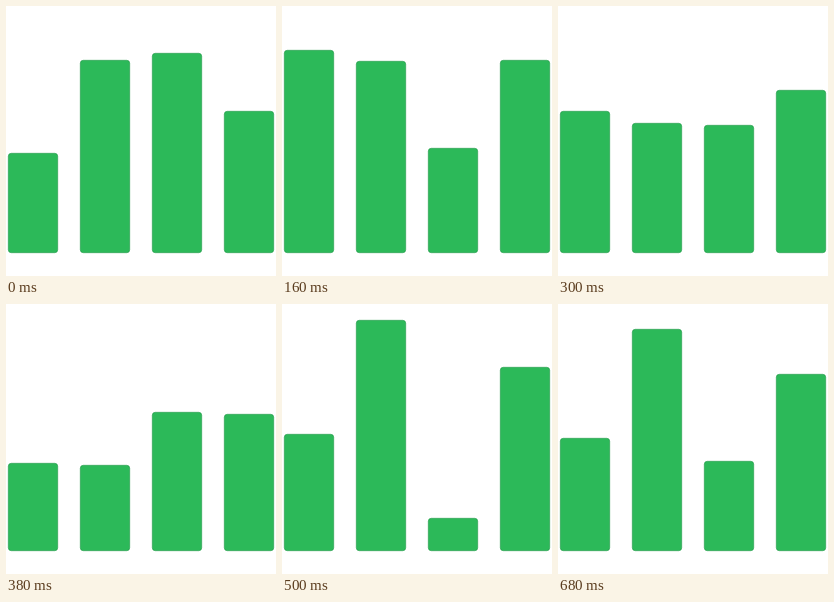
Write an HTML page that moves like this. It is 270x270 px and loops after 720 ms.

```html
<!DOCTYPE html>
<html lang="en">
<head>
<meta charset="utf-8">
<title>Equalizer bars</title>
<style>
  html, body { margin: 0; width: 100%; height: 100%; overflow: hidden; background: #fff; }
  svg { display: block; width: 100%; height: 100%; }
  rect { fill: #2cb959; stroke: #25994b; stroke-width: .6; }
</style>
</head>
<body>
<svg id="stage" viewBox="0 0 270 270"></svg>
<script>
const LOOP = 720, FLOOR = 247, WIDTH = 50, PITCH = 72, LEFT = 2;

// Start time of every step in the loop
const starts = [0, 40, 80, 120, 160, 220, 260, 300, 340, 380, 420, 460, 500, 540, 580, 620, 680];

// Key steps and the top edge of each bar at those steps
const keys = [0, 2, 4, 6, 9, 12, 13, 16, 17];
const tops = [
  [147, 63, 44, 74, 159, 130, 128, 134, 147],
  [54, 53, 55, 89, 161, 16, 9, 25, 54],
  [47, 123, 142, 127, 108, 214, 219, 157, 47],
  [105, 64, 54, 69, 110, 63, 60, 70, 105]
];

// Monotone cubic: flat at every turning point
function slope(v, i) {
  if (i === 0 || i === keys.length - 1) {
    const j = i ? i - 1 : 0;
    return (v[j + 1] - v[j]) / (keys[j + 1] - keys[j]);
  }
  const a = (v[i] - v[i - 1]) / (keys[i] - keys[i - 1]);
  const b = (v[i + 1] - v[i]) / (keys[i + 1] - keys[i]);
  return a * b > 0 ? 2 * a * b / (a + b) : 0;
}

function topAt(v, step) {
  let i = 0;
  while (i < keys.length - 2 && keys[i + 1] <= step) i++;
  const h = keys[i + 1] - keys[i], t = (step - keys[i]) / h, u = 1 - t;
  return u * u * (1 + 2 * t) * v[i] + t * t * (3 - 2 * t) * v[i + 1]
    + h * t * u * (u * slope(v, i) - t * slope(v, i + 1));
}

const stage = document.getElementById('stage');
const bars = tops.map((_, i) => {
  const bar = document.createElementNS('http://www.w3.org/2000/svg', 'rect');
  bar.setAttribute('x', LEFT + i * PITCH + .3);
  bar.setAttribute('width', WIDTH - .6);
  bar.setAttribute('rx', 3);
  return stage.appendChild(bar);
});

function draw(now) {
  const time = now % LOOP;
  let step = starts.length - 1;
  while (step > 0 && starts[step] > time) step--;
  bars.forEach((bar, i) => {
    const top = Math.round(topAt(tops[i], step));
    bar.setAttribute('y', top + .3);
    bar.setAttribute('height', FLOOR - top - .6);
  });
}

let origin = null;
function tick(now) {
  if (origin === null) origin = now;
  draw(Math.max(0, now - origin));
  requestAnimationFrame(tick);
}
draw(0);
requestAnimationFrame(tick);
</script>
</body>
</html>
```
